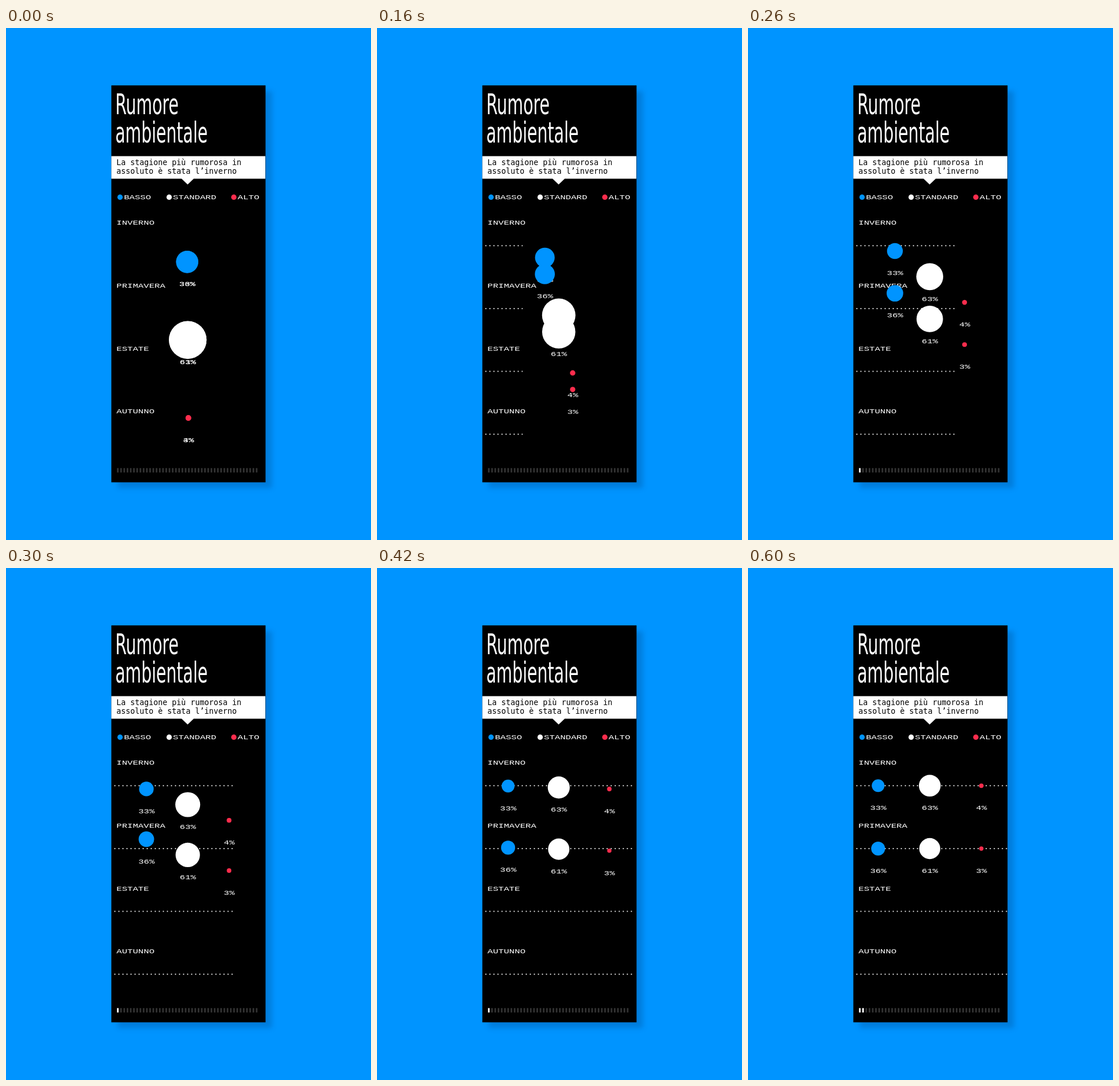
An HTML page for the animation above (2.6 s loop, 632 px wide and 885 px high).

```html
<!DOCTYPE html>
<html lang="it">
<head>
<meta charset="utf-8">
<title>Rumore ambientale</title>
<style>
  html, body { margin: 0; width: 100%; height: 100%; overflow: hidden; background: #0094ff; }
  svg { display: block; width: 632px; height: 885px; }
  .panel { filter: drop-shadow(11px 10px 4.5px rgba(0, 20, 60, .18)); }
  .title { font: 50px "DejaVu Sans", sans-serif; fill: #fff; }
  .note { font: 13.3px "DejaVu Sans Mono", monospace; fill: #000; }
  .caps { font: 11.6px "Liberation Mono", monospace; fill: #fff; }
</style>
</head>
<body>
<svg id="stage" viewBox="0 0 632 885">
  <defs><clipPath id="reveal"><rect id="wipe" x="182" y="320" width="0" height="420"/></clipPath></defs>
  <rect width="632" height="885" fill="#0094ff"/>
  <rect class="panel" x="182.4" y="99.2" width="267" height="686.1" fill="#000"/>
  <path d="M182.4 221.5H449V260.5H325L314.5 270.5L304 260.5H182.4Z" fill="#fff"/>
  <text class="note" x="191.3" y="236.7">La stagione più rumorosa in</text>
  <text class="note" x="191.3" y="252.2">assoluto è stata l’inverno</text>
</svg>
<script>
const LOOP = 2600, MOVE = 512, LEAD = 24;
const ROW_Y = [376.3, 485, 593.5, 702.2];
const BLUE = '#0094ff', WHITE = '#fff', RED = '#ff2d4d';
const stage = document.getElementById('stage');
const wipe = document.getElementById('wipe');

function add(tag, attrs, text, parent = stage) {
  const el = document.createElementNS('http://www.w3.org/2000/svg', tag);
  for (const key in attrs) el.setAttribute(key, attrs[key]);
  if (text) el.textContent = text;
  parent.append(el);
  return el;
}

// Condensed display face and wide small caps, one proportion each
const WIDE = 1.35;
const place = (x, y, wide) => `translate(${x} ${y}) scale(${wide} 1)`;
const title = (text, y) => add('text', { class: 'title', transform: place(189.2, y, .567) }, text);
const caps = (text, x, y) => add('text', { class: 'caps', transform: place(x, y, WIDE) }, text);

title('Rumore', 148.7);
title('ambientale', 198);

[['BASSO', 197.5, BLUE, 204.2], ['STANDARD', 282.5, WHITE, 289], ['ALTO', 394.5, RED, 401]]
  .forEach(([text, cx, fill, x]) => {
    add('circle', { cx, cy: 292.4, r: 4.6, fill });
    caps(text, x, 296.2);
  });

['INVERNO', 'PRIMAVERA', 'ESTATE', 'AUTUNNO'].forEach((name, i) => caps(name, 191.3, ROW_Y[i] - 36));

const dots = add('g', { 'clip-path': 'url(#reveal)', fill: WHITE });
for (const y of ROW_Y)
  for (let i = 0; i < 38; i++)
    add('rect', { x: 187.6 + i * 7, y: y - .9, width: 1.8, height: 1.8 }, '', dots);

const bars = Array.from({ length: 44 }, (_, i) =>
  add('rect', { x: 192.2 + i * 5.59, y: 760.7, width: 2.8, height: 7.6, fill: '#333' }));

// Both rows of a column start from one spot and size
const columns = [
  { fill: BLUE, x: [314, 225.3], y: 404.2, r: 19.2 },
  { fill: WHITE, x: [314.7, 314.7], y: 539.5, r: 32.6 },
  { fill: RED, x: [315.5, 404], y: 674.8, r: 4.9 }
];
const values = [
  [['33%', 11], ['63%', 18.8], ['4%', 3.9]],
  [['36%', 12], ['61%', 18.2], ['3%', 3.7]]
];
const bubbles = values.flatMap((row, i) => row.map(([text, r], j) => {
  const col = columns[j];
  const disc = add('circle', { fill: col.fill });
  const label = add('text', { class: 'caps', 'text-anchor': 'middle' }, text);
  return { disc, label, x: col.x, y: [col.y, ROW_Y[i]], r: [col.r, r] };
}));

const mix = ([a, b], p) => a + (b - a) * p;

// Cubic bezier (.517, 0, .415, 1), solved by bisection
function ease(x) {
  if (x >= 1) return 1;
  let lo = 0, hi = 1, s = .5;
  for (let i = 0; i < 24; i++) {
    s = (lo + hi) / 2;
    const at = 1.551 * (1 - s) ** 2 * s + 1.245 * (1 - s) * s * s + s ** 3;
    if (at < x) lo = s; else hi = s;
  }
  return s * s * (3 - 2 * s);
}

function draw(t) {
  const p = ease((t + LEAD) / MOVE);
  wipe.setAttribute('width', 267 * p);
  for (const b of bubbles) {
    const x = mix(b.x, p), y = mix(b.y, p);
    b.disc.setAttribute('cx', x);
    b.disc.setAttribute('cy', y);
    b.disc.setAttribute('r', mix(b.r, p));
    b.label.setAttribute('transform', place(x + .2, y + 42, WIDE));
  }
  bars[0].setAttribute('fill', t >= 240 ? WHITE : '#333');
  bars[1].setAttribute('fill', t >= 500 ? WHITE : '#333');
}

const start = performance.now();
function tick(now) {
  draw(Math.max(0, now - start) % LOOP);
  requestAnimationFrame(tick);
}
draw(0);
requestAnimationFrame(tick);
</script>
</body>
</html>
```
